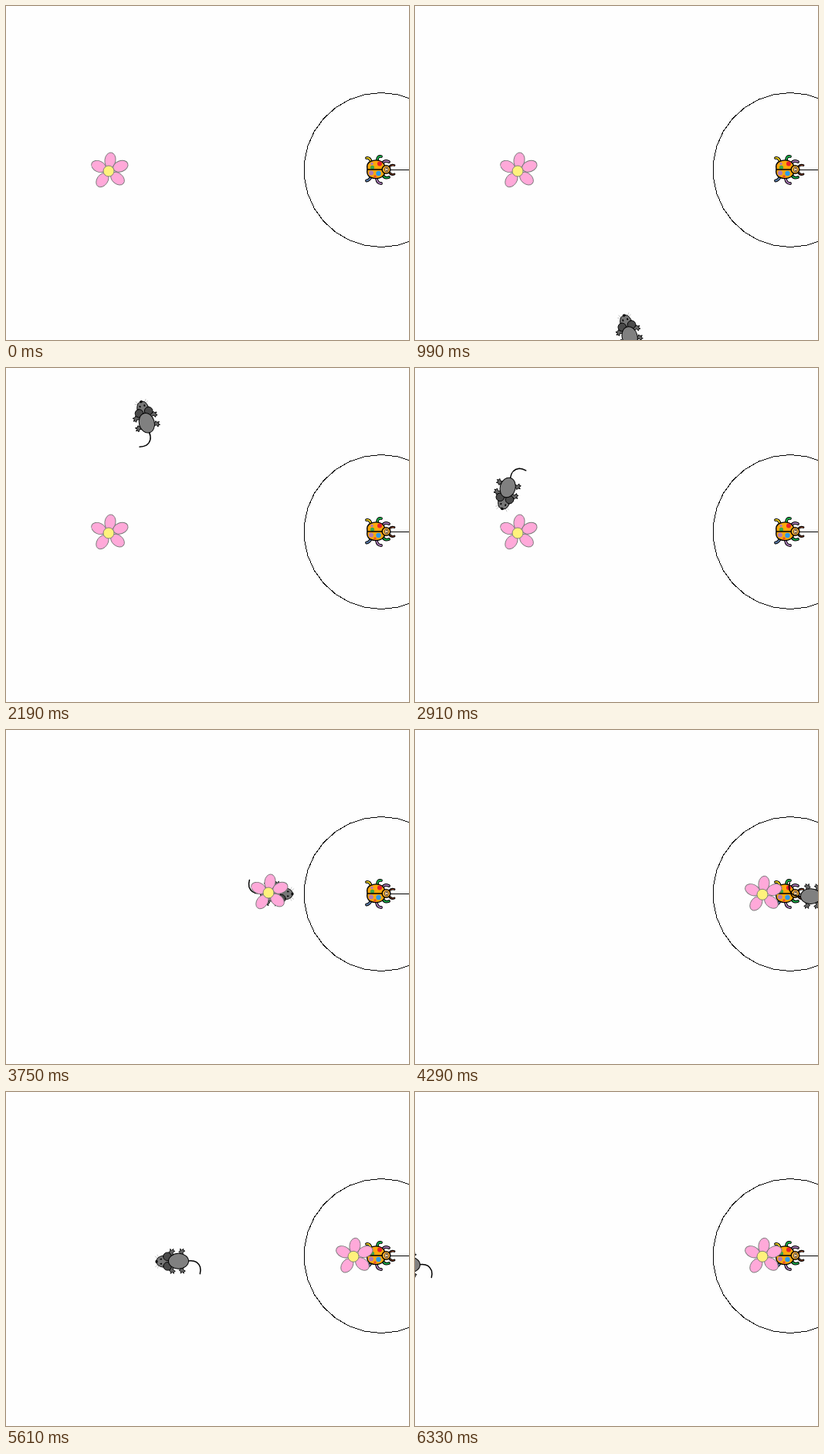
These frames come from a looping animation (522x433 px, 6430 ms). An HTML page:

```html
<!DOCTYPE html>
<html lang="en">
<head>
<meta charset="utf-8">
<title>Mouse, flower and beetle</title>
<style>
  html, body { margin: 0; width: 100%; height: 100%; overflow: hidden; background: #fefefe; }
  svg { display: block; width: 522px; height: 433px; }
  .pen { fill: none; stroke: #000; stroke-width: 1; shape-rendering: crispEdges; }
  .ink { stroke: #000; stroke-linejoin: round; stroke-linecap: round; }
</style>
</head>
<body>
<svg id="stage" viewBox="0 0 522 433">
  <polygon id="ring" class="pen"/>
  <path class="pen" d="M498 212.5H522"/>
  <g id="beetle">
    <g id="legs" fill="none" stroke-linecap="round"></g>
    <g class="ink" stroke-width="1.4">
      <path fill="#ffa90a" d="M468 211.8Q466.5 204 472 201.5Q480 198 487 202Q491.5 206 491.5 212Q491.5 218 487 221.5Q480 225.5 472 222Q466.5 219 468 211.8Z"/>
      <circle cx="492.5" cy="212" r="5.4" fill="#f9ae2c"/>
    </g>
    <g id="spots"></g>
    <path class="ink" stroke-width="1.4" fill="none" d="M468 212H487"/>
    <ellipse cx="492.8" cy="212" rx="2.4" ry="3.4" fill="#e8c9a0" stroke="#553311" stroke-width=".8"/>
    <path d="M492.2 210.2h1.6M492.2 213.8h1.6" stroke="#000" stroke-width="1.1"/>
  </g>
  <g id="mouse">
    <path class="ink" fill="none" stroke-width="1.5" d="M-13 0C-21 1 -26 -2 -28.3 -8Q-29.3 -12 -28 -17"/>
    <g id="paws" class="ink" stroke-width=".9"></g>
    <path d="M24 -3L27 -9M25 -3L30 -7M24 3L27 9M25 3L30 7" stroke="#aaa" stroke-width=".6"/>
    <path class="ink" stroke-width=".9" fill="#777" d="M13 -7Q21 -9 26.5 -4.5Q30 0 26.5 4.5Q21 9 13 7Z"/>
    <g class="ink" stroke-width=".9" fill="#4a4a4a">
      <circle cx="14" cy="-6.3" r="5.3"/>
      <circle cx="14" cy="6.3" r="5.3"/>
    </g>
    <ellipse class="ink" stroke-width="1" cx="-.5" rx="13" ry="9.9" fill="#808080"/>
    <ellipse cx="28" rx="1.6" ry="2"/>
    <path d="M21 -3h2.4M21 3h2.4" stroke="#000" stroke-width="1.7"/>
  </g>
  <g id="flower" stroke="#777" stroke-width=".9">
    <g id="petals" fill="#ffa9d9"></g>
    <circle r="7" fill="#fff27c"/>
  </g>
</svg>
<script>
const $ = id => document.getElementById(id);
const stage = $('stage'), mouse = $('mouse'), flower = $('flower');

// Circle drawn as a 30-sided pen trail
$('ring').setAttribute('points', Array.from({ length: 30 }, (_, i) => {
  const a = i * Math.PI / 15;
  return [486 + 100 * Math.sin(a), 212.5 - 100 * Math.cos(a)].map(v => v.toFixed(1));
}).join(' '));

$('petals').innerHTML = [[-82, 14.2], [-22, 16.6], [40, 15], [125, 14.2], [205, 14.2]]
  .map(([a, d]) => `<ellipse cx="${d}" rx="10" ry="7" transform="rotate(${a})"/>`).join('');

$('paws').innerHTML = [[-5, -1], [8, -1], [-5, 1], [8, 1]].map(([x, side]) =>
  `<path fill="#666" transform="translate(${x} 0) scale(1 ${side})"
    d="M-2 8L-1 11L-4 13L-2 14L-2 16L0 14L2 16L2 13L4 12L2 10L2 7Z"/>`).join('');

$('legs').innerHTML = [
  ['#f2d21b', 'M473 202Q471 196 467 197'],
  ['#19b34a', 'M481 200Q481 194 486 195'],
  ['#a678b4', 'M488 205Q489 199 496 202'],
  ['#5f83b5', 'M473 221Q471 226 467 226.5'],
  ['#a678b4', 'M480 224Q481 230 486 230'],
  ['#19b34a', 'M488 219Q490 224 496 222'],
  ['#b5552b', 'M496 209Q499 205 503 206.5'],
  ['#b5552b', 'M496 215Q499 220 503 218']
].map(([color, d], i) => {
  const w = i < 6 ? 3.8 : 2.8;
  return `<path stroke="#000" stroke-width="${w}" d="${d}"/>
    <path stroke="${color}" stroke-width="${w - 2}" d="${d}"/>`;
}).join('');

$('spots').innerHTML = [
  ['#e8202a', 484, 204.5, 3], ['#2b9bea', 482.5, 217, 3.2], ['#3da648', 474.5, 209.3, 2.6],
  ['#b07cb5', 473, 216.5, 3], ['#b07cb5', 474, 204.5, 1.8], ['#e8502a', 478, 221, 1.8]
].map(([color, x, y, r]) => `<circle cx="${x}" cy="${y}" r="${r}" fill="${color}"/>`).join('');

const LOOP = 6430, START = 930, STEP = 60, LAST = 90;
const HALF_STEPS = [5, 12, 20, 38, 50, 60, 72, 83];
const PICK = 690, DROP = 1010;

// Walk: distance travelled, x, y
const WALK = [
  [0, 283.2, 447.5], [466.4, 162.4, -3], [630, 120, 155.5], [PICK, 133, 207.6],
  [1135, 578, 216.9], [1135, 578, 212], [1720, -7, 224]
];

function walkAt(s) {
  let i = 0;
  while (i < WALK.length - 2 && s > WALK[i + 1][0]) i++;
  const [s0, x0, y0] = WALK[i], [s1, x1, y1] = WALK[i + 1];
  const k = (s - s0) / (s1 - s0);
  return {
    x: x0 + (x1 - x0) * k,
    y: y0 + (y1 - y0) * k,
    turn: Math.atan2(y1 - y0, x1 - x0) * 180 / Math.PI
  };
}

const place = (el, x, y, turn = 0) =>
  el.setAttribute('transform', `translate(${x.toFixed(2)} ${y.toFixed(2)}) rotate(${turn.toFixed(2)})`);

let shown;
function draw(n) {
  if (n === shown) return;
  shown = n;
  mouse.style.display = n < 0 ? 'none' : '';
  if (n < 0) {
    place(flower, 133, 214);
    return;
  }
  const s = 20 * n - 10 * HALF_STEPS.filter(h => h <= n).length;
  const { x, y, turn } = walkAt(s);
  place(mouse, x, y, turn);
  if (s < PICK) place(flower, 133, 214);
  else {
    const held = walkAt(Math.min(s, DROP));
    place(flower, held.x - 3, held.y - 1);
  }
  stage.append(...(s > DROP ? [flower, mouse] : [mouse, flower]));
}

const t0 = performance.now();
function tick() {
  const t = (performance.now() - t0) % LOOP;
  draw(t < START ? -1 : Math.min(LAST, Math.floor((t - START) / STEP)));
  requestAnimationFrame(tick);
}
tick();
</script>
</body>
</html>
```
